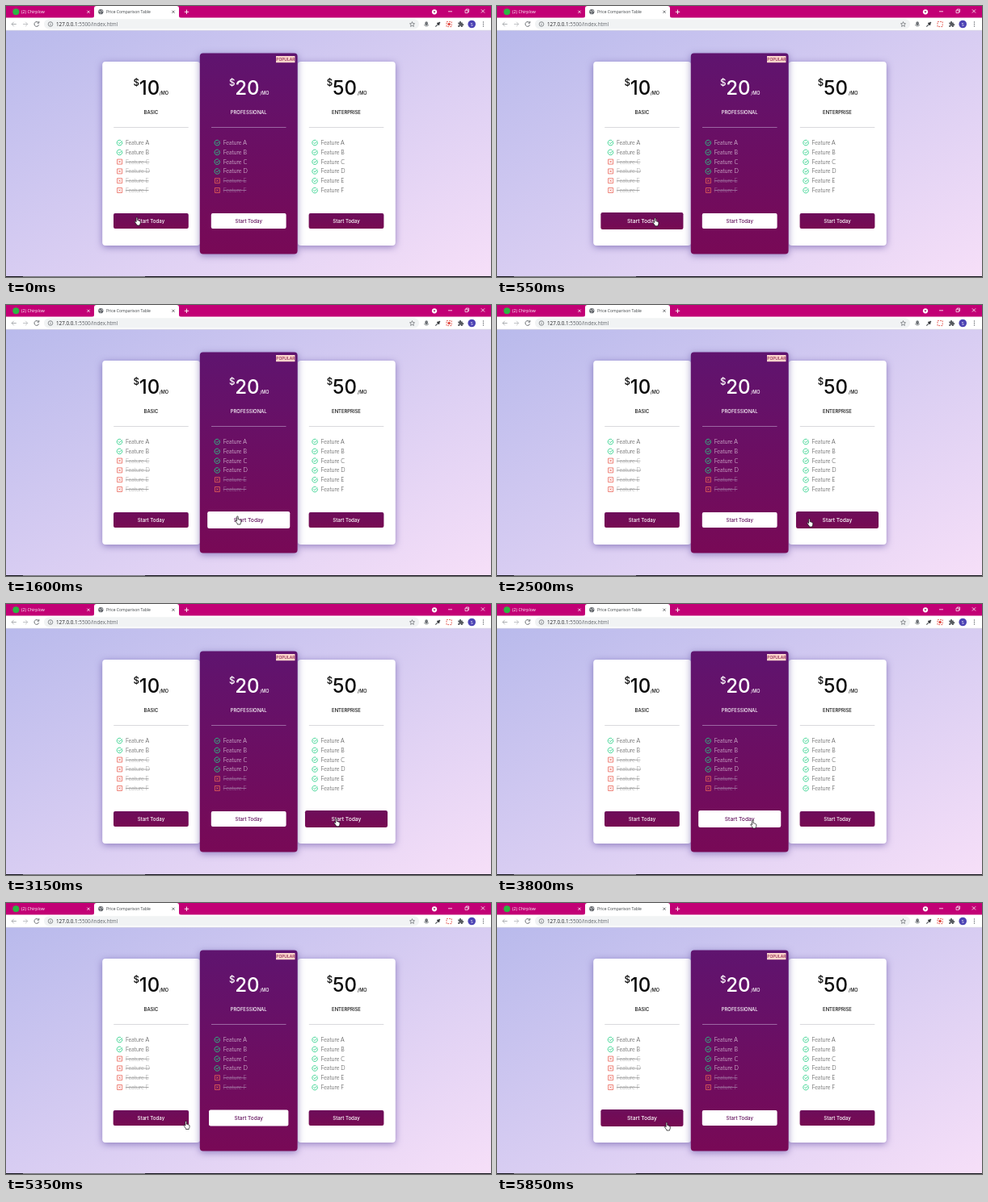
These frames come from a looping animation (600 px wide and 336 px high, 5.9 s). An HTML page:

```html
<!DOCTYPE html>
<html lang="en">
<head>
<meta charset="utf-8">
<title>Price Comparison Table</title>
<style>
html, body { margin: 0; width: 100%; height: 100%; overflow: hidden; }
svg { display: block; width: 600px; height: 336px; }
text { white-space: pre; }
.ui { font-family: "Open Sans", "Noto Sans", sans-serif; }
.head { font-family: Inter, Roboto, sans-serif; font-weight: 500; }
.item { font: 300 7px Lato, "Open Sans", sans-serif; }
.off { text-decoration: line-through; }
.card { filter: drop-shadow(0 2px 4px rgba(66, 44, 140, .5)); }
</style>
</head>
<body>
<svg id="stage" viewBox="0 0 600 336" xmlns="http://www.w3.org/2000/svg"></svg>
<script>
const LOOP = 5900, STEP = 50, FADE = 300, GAP = 120.8;

// Pointer path: time, x, y
const PATH = [
  [0, 163, 267], [250, 176, 267], [600, 200, 268], [850, 212, 268], [1000, 231, 267],
  [1100, 270.5, 267], [1350, 279, 267], [1600, 287.5, 267], [1850, 318, 268],
  [2000, 347, 269], [2130, 375, 270], [2500, 387.5, 270], [2900, 418, 270],
  [3200, 408, 271], [3380, 374, 272], [3450, 347, 272], [3800, 317.5, 273],
  [4000, 330, 272], [4080, 347, 271], [4150, 375, 270], [4350, 392, 269],
  [4500, 374, 268], [4760, 347, 267], [4800, 334.5, 267], [5100, 285, 270],
  [5220, 254, 273], [5300, 230, 275], [5500, 205, 277], [5850, 211, 277]
];

// Hover spans for each button
const HOVER = [
  [[0, 1000], [5300, LOOP + FADE]],
  [[1070, 2000], [3450, 4080], [4760, 5220]],
  [[2130, 3380], [4150, 4500]]
];

const PLANS = [
  { name: 'BASIC', price: 10, on: 2 },
  { name: 'PROFESSIONAL', price: 20, on: 4, dark: true },
  { name: 'ENTERPRISE', price: 50, on: 6 }
];

const rect = (x, y, w, h, fill, more = '') =>
  `<rect x="${x}" y="${y}" width="${w}" height="${h}" fill="${fill}" ${more}/>`;
const circle = (x, y, r, fill, more = '') =>
  `<circle cx="${x}" cy="${y}" r="${r}" fill="${fill}" ${more}/>`;
const line = (d, color, width = 0.8, more = '') =>
  `<path d="${d}" fill="none" stroke="${color}" stroke-width="${width}" ${more}/>`;
const text = (x, y, str, cls, fill, size = '', more = '') =>
  `<text x="${x}" y="${y}" class="${cls}" fill="${fill}" ${size && `font-size="${size}"`} ${more}>${str}</text>`;
const gradient = (id, from, to, dir) =>
  `<linearGradient id="${id}" ${dir}><stop stop-color="${from}"/><stop offset="1" stop-color="${to}"/></linearGradient>`;
const cross = (x, y, r) => `M${x - r} ${y - r}l${2 * r} ${2 * r}m0 ${-2 * r}l${-2 * r} ${2 * r}`;
const MID = 'text-anchor="middle"';

function tabs() {
  return rect(0, 0, 600, 15, '#c20075') +
    circle(12.3, 7.2, 4, '#2cb742') +
    text(19, 9.2, '(2) Chirplow', 'ui', '#fff', 5.2) +
    line(cross(102, 7.3, 1.6), '#fff') +
    '<path d="M106 15q3 0 3-3V3q0-3 3-3H211q3 0 3 3v9q0 3 3 3z" fill="#fff"/>' +
    circle(117.3, 7.2, 3.1, '#62666b') +
    line('M115 6.2l2 .5l.4 1.6M118 4.8l.5 1.4l1.5 .3M116.2 9l1.2 .6', '#fff', 0.6) +
    text(124, 9.2, 'Price Comparison Table', 'ui', '#3c4043', 5) +
    line(cross(207, 7.3, 1.6), '#4a4d51') +
    line('M223.5 4.6v5.4m-2.7-2.7h5.4', '#fff', 0.9) +
    circle(530, 7.3, 3.1, '#fff') +
    '<path d="M528.5 6.5h3l-1.5 1.9z" fill="#8d0055"/>' +
    line('M547 6.8h5', '#fff') +
    line('M568 5.2h3.4v3.4H568zM569.2 5.2V4h3.4v3.4h-1.2', '#fff', 0.7) +
    line(cross(590, 6.4, 2.1), '#fff');
}

function toolbar() {
  const ink = '#5f6368';
  return rect(0, 14.5, 600, 15.5, '#fff') +
    rect(47, 16.2, 464, 12.4, '#f1f3f4', 'rx="6.2"') +
    rect(0, 29.8, 600, 0.7, '#dcdce4') +
    line('M12.8 22.5H7m2.7-2.7L7 22.5l2.7 2.7', '#9a9da1') +
    line('M21 22.5h5.8m-2.7-2.7l2.7 2.7l-2.7 2.7', '#b4b7ba') +
    line('M40.3 20.8a2.9 2.9 0 1 0 .4 2.5M40.8 19v2.2h-2.2', ink, 0.9) +
    circle(55, 22.5, 2.8, 'none', `stroke="${ink}" stroke-width=".7"`) +
    line('M55 22.2v1.8M55 20.8v.6', ink, 0.7) +
    `<text x="62" y="24.8" class="ui" font-size="6.3" fill="#202124">127.0.0.1<tspan fill="#5f6368">:5500/index.html</tspan></text>` +
    line('M502.5 19.6l.9 2l2.1 .2l-1.6 1.5l.5 2.1l-1.9-1.1l-1.9 1.1l.5-2.1l-1.6-1.5l2.1-.2z', ink, 0.7) +
    rect(518.3, 19.2, 3.6, 5.2, '#707479', 'rx="1.8"') +
    line('M517.3 23q.6 2.2 2.8 2.2t2.8-2.2', '#707479', 0.7) +
    line('M531.3 25.7l3.4-3.4', '#55595e', 1.2) +
    line('M533.5 20.9l2.6 2.6M534.8 22.2l2-2', '#33363a', 1.8) +
    line('M545 19.4h6.2v6.2H545z', '#e0473e', 0.9, 'stroke-dasharray="1.8 1.3 1.8 1.3"') +
    circle(548.1, 22.5, 1.7, '#e0473e', 'id="rec"') +
    '<path d="M559.3 20.5h1.7q-.3-1.8 1-1.8t1 1.8h1.8v1.8q1.6-.3 1.6 1t-1.6 1v1.6h-1.9q0-1.4-.9-1.4t-.9 1.4h-1.8v-1.8q1.3 0 1.3-.9t-1.3-.9z" fill="#55595e"/>' +
    circle(576.2, 22.5, 4.8, '#4c43b4') +
    text(576.2, 24.5, 'S', 'ui', '#fff', 5.4, MID) +
    [20, 22.5, 25].map(y => circle(590.5, y, 0.7, ink)).join('');
}

function feature(x, i, plan) {
  const y = 169.5 + i * 11.8, on = i < plan.on;
  const color = on ? (plan.dark ? '#fff' : '#222') : (plan.dark ? '#a883ab' : '#8d8d8d');
  const icon = on
    ? line(`M${x + 24.4} ${y - 1}a3.3 3.3 0 1 1-1.5-1.8M${x + 19.8} ${y - 0.2}l1.3 1.4l3.3-3.5`, '#28cf86', 0.85)
    : line(`M${x + 18.4} ${y - 3}h6v6h-6z${cross(x + 21.4, y, 1.2)}`, '#ea6558', 0.8);
  return icon + text(x + 28.7, y + 2.5, 'Feature ' + 'ABCDEF'[i], on ? 'item' : 'item off', color);
}

function card(plan, i) {
  const x = 119.2 + i * GAP, mid = x + 60.2;
  const ink = plan.dark ? '#fff' : '#0c0c0c';
  const box = plan.dark
    ? rect(x - 0.2, 58.5, 120.8, 249, 'url(#plum)', 'rx="4" class="card"')
    : rect(x, 69, 121, 228, '#fff', 'rx="4" class="card"');
  const badge = plan.dark
    ? rect(334, 62, 23.5, 8.2, '#fbd5cb') + text(345.8, 68, 'POPULAR', 'head', '#8a1f4c', 4.9, MID)
    : '';
  const left = i ? x + 43.2 : x + 45.6;
  return box + badge +
    text(x + 38 - (i ? 2 : 0) + (i ? 0 : 0.3), 99.3, '$', 'head', ink, 11.5) +
    text(left, 110.2, plan.price, 'head', ink, 24) +
    text(x + (i ? 74.3 : 70.5), 110.2, '/MO', 'head', ink, 5.5) +
    text(mid, 133.7, plan.name, 'head', ink, 5.9, MID) +
    rect(x + 14, 150.2, 92.5, 0.7, plan.dark ? '#b38bbd' : '#c9c9cf') +
    [0, 1, 2, 3, 4, 5].map(n => feature(x, n, plan)).join('') +
    `<g class="btn">` +
    rect(mid - 46.4, 257, 92.8, 19, plan.dark ? '#fff' : 'url(#wine)', 'rx="2"') +
    text(mid, 268.6, 'Start Today', 'head', plan.dark ? '#61105c' : '#fff', 6.1, MID) +
    '</g>';
}

const HAND = 'M-1.9 -4.2q0-.9.8-.9t.8.9V-1.3q1.2-.3 1.3.5q1.1-.3 1.2.5q1.1 0 1.1.9V2q0 1.2-.8 2.1V5H-1.2V4.2L-3.6.9q-.4-1 .4-1.1q.8 0 1.3.9z';
const ARROW = 'M-2-4.5V3.6L-.1 1.9L1.2 4.8L2.5 4.2L1.2 1.4H3.7z';

const stage = document.getElementById('stage');
stage.innerHTML = '<defs>' +
  gradient('sky', '#b9baec', '#f6dff8', 'x1="0" y1="0" x2="1" y2="1"') +
  gradient('plum', '#5f146f', '#780956', 'x1="0" y1="0" x2="0" y2="1"') +
  gradient('wine', '#6d0d5a', '#770a52', 'x1="0" y1="0" x2="0" y2="1"') +
  '</defs>' +
  rect(0, 30, 600, 306, 'url(#sky)') + tabs() + toolbar() +
  card(PLANS[0], 0) + card(PLANS[2], 2) + card(PLANS[1], 1) +
  rect(0, 335, 600, 1, '#17171f') + rect(21, 335, 151, 1, '#77777f') +
  '<path id="pointer" fill="#fff" stroke="#111" stroke-width=".7" stroke-linejoin="round"/>';

const drawn = stage.querySelectorAll('.btn');
const buttons = [drawn[0], drawn[2], drawn[1]];
const pointer = document.getElementById('pointer');
const rec = document.getElementById('rec');

function ease(v) {
  const k = Math.min(1, Math.max(0, v));
  return k * k * (3 - 2 * k);
}

function place(t) {
  const n = PATH.findIndex(p => p[0] > t);
  if (n < 0) return PATH[PATH.length - 1].slice(1);
  const [t0, x0, y0] = PATH[n - 1], [t1, x1, y1] = PATH[n];
  const k = (t - t0) / (t1 - t0);
  return [x0 + (x1 - x0) * k, y0 + (y1 - y0) * k];
}

function render(t) {
  let over = false;
  HOVER.forEach((spans, i) => {
    let grow = 0;
    for (const [start, end] of spans) {
      grow = Math.max(grow, ease((t - start) / FADE) * (1 - ease((t - end) / FADE)));
      over = over || (t >= start && t < end);
    }
    const cx = 179.4 + i * GAP, s = 1 + 0.1 * grow;
    buttons[i].setAttribute('transform', `translate(${cx} 266.5) scale(${s}) translate(${-cx} -266.5)`);
  });
  const [x, y] = place(t);
  pointer.setAttribute('d', over ? HAND : ARROW);
  pointer.setAttribute('transform', `translate(${x} ${y})`);
  rec.setAttribute('opacity', (t + 600) % 2000 < 1000 ? 1 : 0);
}

const begin = performance.now();
function tick() {
  const t = (performance.now() - begin) % LOOP;
  render(Math.floor(t / STEP) * STEP);
  requestAnimationFrame(tick);
}
tick();
</script>
</body>
</html>
```
